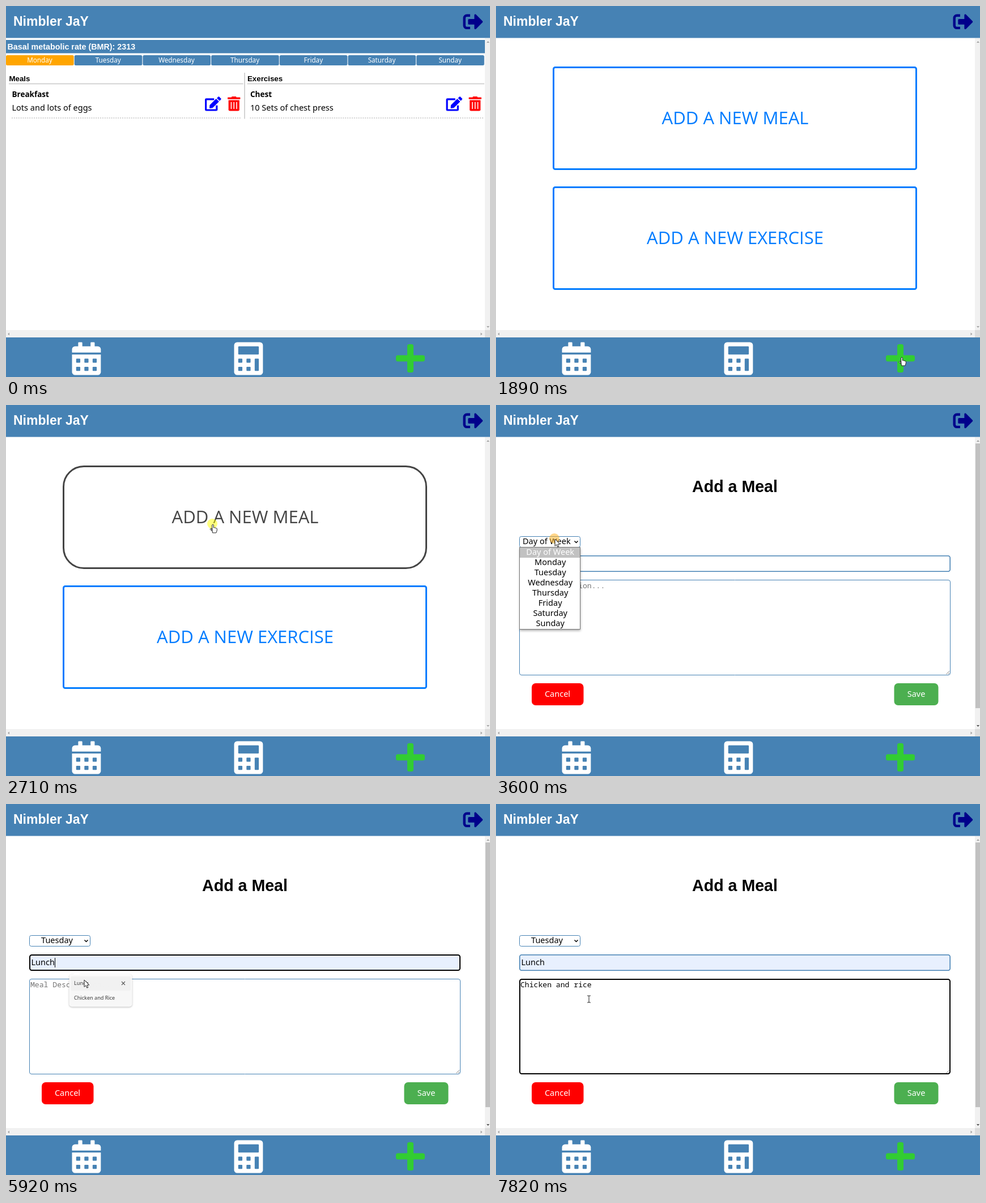
An HTML page with a canvas for the animation above (8 s loop, 854x656 px).

```html
<!DOCTYPE html>
<html lang="en">
<head>
<meta charset="utf-8">
<title>Meal planner</title>
<style>
html, body { margin: 0; width: 100%; height: 100%; overflow: hidden; background: #fff; }
canvas { display: block; }
</style>
</head>
<body>
<canvas id="stage" width="854" height="656"></canvas>
<script>
const g = document.getElementById('stage').getContext('2d');
const LOOP = 8000, BLUE = '#4682b4', LINK = '#007bff', GREY = '#d3d3d3';
const SANS = '"Noto Sans", sans-serif', ARIAL = '"Liberation Sans", Arial, sans-serif';
const OPEN = '"Open Sans", sans-serif', MONO = '"Noto Sans Mono", monospace';
const BODY = '14.5px ' + SANS, CODE = '13.1px ' + MONO;
const DAYS = ['Monday', 'Tuesday', 'Wednesday', 'Thursday', 'Friday', 'Saturday', 'Sunday'];

const clamp = v => Math.max(0, Math.min(1, v));
const ramp = (t, start, length) => clamp((t - start) / length);
const smooth = u => u * u * (3 - 2 * u);
const within = (t, a, b) => t >= a && t < b;

function rect(x, y, w, h, color) {
  g.fillStyle = color;
  g.fillRect(x, y, w, h);
}
function round(x, y, w, h, r, fill, stroke, line = 1) {
  g.beginPath();
  g.roundRect(x, y, w, h, r);
  if (fill) { g.fillStyle = fill; g.fill(); }
  if (stroke) { g.strokeStyle = stroke; g.lineWidth = line; g.stroke(); }
}
function text(s, x, y, font, color = '#000', align = 'left') {
  g.font = font;
  g.fillStyle = color;
  g.textAlign = align;
  g.fillText(s, x, y);
}
function shape(path, fill, stroke, line = 1) {
  const p = new Path2D(path);
  if (fill) { g.fillStyle = fill; g.fill(p); }
  if (stroke) { g.strokeStyle = stroke; g.lineWidth = line; g.stroke(p); }
}
function at(x, y, scale, draw) {
  g.save();
  g.translate(x, y);
  g.scale(scale, scale);
  draw();
  g.restore();
}

// Icons, drawn on a 512 unit grid
function editIcon() {
  shape('M325 96H48a16 16 0 0 0-16 16V464a16 16 0 0 0 16 16H400a16 16 0 0 0 16-16V315', null, '#00f', 64);
  g.lineJoin = 'round';
  shape('M396 88L488 180 270 396 170 406 180 304Z', '#00f', '#00f', 20);
  shape('M488 18L558 88 518 133 442 57Z', '#00f', '#00f', 30);
}
function trashIcon() {
  round(0, 32, 448, 64, 16, 'red');
  round(140, 0, 168, 60, 20, 'red');
  round(32, 128, 384, 384, [0, 0, 48, 48], 'red');
  for (const x of [112, 208, 304]) round(x, 192, 32, 256, 16, '#fff');
}
function exitIcon() {
  shape('M497 273L329 441c-15 15-41 4.5-41-17v-96H152a24 24 0 0 1-24-24v-96a24 24 0 0 1 24-24h136V88c0-21 26-32 41-17l168 168c9 9 9 25 0 34z', '#00008b');
  shape('M180 96H96a64 64 0 0 0-64 64v192a64 64 0 0 0 64 64h84', null, '#00008b', 64);
}
function calendarIcon() {
  round(0, 64, 448, 96, [48, 48, 0, 0], '#fff');
  round(0, 192, 448, 320, [0, 0, 48, 48], '#fff');
  for (const x of [96, 288]) round(x, 0, 64, 100, 12, '#fff');
  for (const y of [256, 384]) for (const x of [64, 192, 320]) round(x, y, 64, 64, 10, BLUE);
}
function calculatorIcon() {
  round(0, 0, 448, 512, 48, '#fff');
  round(64, 64, 320, 128, 12, BLUE);
  for (const y of [256, 384]) for (const x of [64, 192]) round(x, y, 64, 64, 10, BLUE);
  round(320, 256, 64, 192, 10, BLUE);
}

// Pointer shapes, origin at the hotspot
const pointers = {
  arrow() {
    shape('M0 0V12.4L2.8 9.8 4.8 14.2 6.8 13.3 4.9 9.1H8.8Z', '#fff', '#222', 1);
  },
  hand() {
    shape('M-1.3 1Q0-1 1.3 1V6Q3 5 3.6 6.3 5.3 5.7 5.8 7 7.4 6.6 7.4 8.6 7.4 12 5.8 15H-.6Q-2-.0 -2 11.6L-4.8 8.6Q-4.6 6.8-2.7 7.9L-1.3 9Z', '#fff', '#222', 1);
  },
  beam() {
    shape('M-3-6H-1L0-5 1-6H3M0-5V5M-3 6H-1L0 5 1 6H3', null, '#333', 1.1);
  }
};

// time, x, y, pointer used from then on
const PATH = [
  [580, 502, 341, 'arrow'], [1000, 806, 638, 'arrow'], [1340, 716, 621, 'hand'],
  [1960, 716, 621, 'hand'], [2450, 365, 211, 'hand'], [2850, 365, 211, 'arrow'],
  [3180, 240, 190, 'arrow'], [3520, 104, 237, 'arrow'], [3690, 104, 237, 'arrow'],
  [3950, 100, 284, 'arrow'], [4200, 100, 284, 'arrow'], [4290, 98, 294, 'arrow'],
  [4360, 98, 294, 'arrow'], [4560, 112, 498, 'arrow'], [4800, 112, 281, 'beam'],
  [5320, 112, 281, 'arrow'], [5440, 134, 306, 'arrow'], [5690, 134, 306, 'arrow'],
  [5780, 138, 311, 'arrow'], [5960, 138, 311, 'arrow'], [6260, 150, 341, 'beam'],
  [6520, 150, 341, 'beam'], [6690, 164, 345, 'beam'], [LOOP, 164, 345, 'beam']
];
const CLICKS = [[1410, 1550], [2640, 2780], [3540, 3680], [4290, 4360], [4830, 4960], [5840, 5900], [6390, 6470]];

function drawPointer(t) {
  const i = PATH.findIndex((k, n) => n < PATH.length - 1 && within(t, k[0], PATH[n + 1][0]));
  if (i < 0) return;
  const [t0, x0, y0, kind] = PATH[i], [t1, x1, y1] = PATH[i + 1];
  const u = smooth(ramp(t, t0, t1 - t0));
  const x = x0 + (x1 - x0) * u, y = y0 + (y1 - y0) * u;
  if (CLICKS.some(([a, b]) => within(t, a, b))) {
    g.beginPath();
    g.arc(x - 1, y - 1, 9, 0, 7);
    g.fillStyle = within(t, 3540, 3680) ? 'rgba(255,180,40,.55)' : 'rgba(255,255,0,.5)';
    g.fill();
  }
  at(x, y, 1, pointers[kind]);
}

function frame(t) {
  const form = t >= 2780;
  rect(0, 0, 854, 56.5, BLUE);
  text('Nimbler JaY', 13, 35, 'bold 23px ' + ARIAL, '#fff');
  at(806.5, 10.2, 0.069, exitIcon);

  rect(845, 57, 9, 517, '#f1f1f1');
  rect(0, 573, 845, 13, '#f1f1f1');
  rect(845, 573, 9, 13, '#dcdcdc');
  if (form) rect(846, 68, 8, 468, '#c1c1c1');
  shape('M848 65L850.5 62 853 65ZM6 577.5V582.5L3 580ZM837.5 577.5V582.5L840.5 580Z', '#a3a3a3');
  shape('M848 566L850.5 569 853 566Z', form ? '#505050' : '#a3a3a3');

  rect(0, 586, 854, 70, BLUE);
  at(116.5, 594.5, 0.1135, calendarIcon);
  at(402.5, 594.5, 0.1135, calculatorIcon);
  round(688, 617.5, 51, 11, 3.5, '#32cd32');
  round(708, 598, 11, 50, 3.5, '#32cd32');
}

function entry(x, right, heading, title, detail) {
  text(heading, x + 5.5, 133, 'bold 13.3px ' + ARIAL);
  rect(x + 5, 136.5, right - x - 5, 2, GREY);
  text(title, x + 10.5, 161, '600 13.5px ' + SANS);
  text(detail, x + 10.5, 185, BODY);
  at(right - 67.5, 160, 0.05, editIcon);
  at(right - 27.5, 160, 0.05, trashIcon);
  g.setLineDash([2, 1.9]);
  shape(`M${x + 10} 198H${right - (x ? 0 : 4)}`, null, GREY, 2);
  g.setLineDash([]);
}

function planPage() {
  rect(0, 60, 845, 23.5, BLUE);
  text('Basal metabolic rate (BMR): 2313', 2.5, 76.5, 'bold 14.3px ' + ARIAL, '#fff');
  DAYS.forEach((day, i) => {
    const x = i * 120.7;
    round(x, 87, 119.6, 18, 2.5, i ? BLUE : 'orange');
    text(day, x + 59.5, 100, '11.7px ' + SANS, '#fff', 'center');
  });
  entry(0, 418.5, 'Meals', 'Breakfast', 'Lots and lots of eggs');
  entry(420.5, 844, 'Exercises', 'Chest', '10 Sets of chest press');
  rect(420, 118, 2, 81.5, GREY);
}

function choice(label, y, hover) {
  const mix = (a, b) => Math.round(a + (b - a) * hover);
  const color = `rgb(${mix(0, 68)},${mix(123, 68)},${mix(255, 68)})`;
  round(101.5, y + 1.5, 640, 180, 3 + 33 * hover, null, color, 3);
  text(label, 422, y + 101.5, '31px ' + OPEN, color, 'center');
}

function choicePage(t) {
  choice('ADD A NEW MEAL', 107, ramp(t, 2310, 200));
  choice('ADD A NEW EXERCISE', 319, ramp(t, 2130, 200) - ramp(t, 2290, 200));
}

function dayMenu(t) {
  g.save();
  g.shadowColor = 'rgba(0,0,0,.35)';
  g.shadowBlur = 4;
  g.shadowOffsetY = 2;
  rect(41.5, 251.5, 107, 145, '#fff');
  g.restore();
  const active = t < 3850 ? 0 : t < 4260 ? 1 : 2;
  ['Day of Week', ...DAYS].forEach((day, i) => {
    const y = 252 + i * 17.9;
    if (i === active) rect(42, y, 106, 18, i ? '#1967d2' : '#c1c1c1');
    const color = i === active ? '#fff' : i ? '#000' : '#888';
    text(day, 95.7, y + 13.3, BODY, color, 'center');
  });
  round(41.5, 251.5, 107, 145, 0, null, '#767676');
}

function suggestions(t) {
  g.save();
  g.globalAlpha = 1 - ramp(t, 5910, 100);
  g.shadowColor = 'rgba(0,0,0,.3)';
  g.shadowBlur = 3;
  g.shadowOffsetY = 1;
  round(111.5, 301, 111, 57.5, 5, '#fff');
  g.shadowColor = 'transparent';
  shape('M118 301.5L125 297 132 301.5Z', '#fff');
  if (t >= 5710) {
    round(114.5, 305, 105.5, 25, 2, '#f1f1f1');
    shape('M204 314L210 320M210 314L204 320', null, '#444', 1.1);
  }
  const font = '9.1px ' + SANS;
  text('Lunch', 120, 320.3, font, '#222');
  text('Chicken and Rice', 120, 346.3, font, '#222');
  g.restore();
}

function box(y, h, focused, fill, line) {
  const w = focused ? 2 : line;
  round(41 + w / 2, y + w / 2, 761 - w, h - w, 3.5, fill, focused ? '#000' : BLUE, w);
}

function formPage(t) {
  const nameFocus = within(t, 4850, 6400), noteFocus = t >= 6400;
  const filled = t >= 5380, typed = t >= 7340;
  text('Add a Meal', 421.5, 154, 'bold 28.6px ' + ARIAL, '#000', 'center');

  round(41.5, 232.5, 107, 19, 3, '#fff', BLUE);
  if (t < 4320) text('Day of Week', 47, 246, BODY);
  else text('Tuesday', 90, 246, BODY, '#000', 'center');
  shape('M138.5 240.5L141.5 243.5 144.5 240.5', null, '#000', 1.5);

  box(266, 29, nameFocus, filled ? '#e8f0fe' : '#fff', 1.6);
  text(filled ? 'Lunch' : 'Meal Name...', 44.5, 285, BODY, filled ? '#000' : '#757575');
  if (nameFocus) rect(filled ? 86 : 44, 272, 1, 17, '#000');

  box(309, 169, noteFocus, '#fff', 1);
  text(typed ? 'Chicken and rice' : 'Meal Description...', 43, 324, CODE, typed ? '#000' : '#757575');
  if (within(t, 6400, 6850)) rect(43, 311, 1, 17, '#000');
  if (within(t, 7340, 7820)) rect(169, 311, 1, 17, '#000');
  shape('M794.5 476L800 470.5M798 476L800 474', null, '#777', 1);

  round(63, 492, 91.5, 39, 7, 'red');
  text('Cancel', 108.5, 516, BODY, '#fff', 'center');
  round(702.5, 492, 78, 39, 7, '#4caf50');
  text('Save', 741.5, 516, BODY, '#fff', 'center');

  if (within(t, 3560, 4320)) dayMenu(t);
  if (within(t, 4870, 6010)) suggestions(t);
}

function draw(t) {
  rect(0, 0, 854, 656, '#fff');
  frame(t);
  if (t < 1480) planPage();
  else if (t < 2780) choicePage(t);
  else formPage(t);
  drawPointer(t);
}

const start = performance.now();
function tick() {
  draw((performance.now() - start) % LOOP);
  requestAnimationFrame(tick);
}
tick();
</script>
</body>
</html>
```
